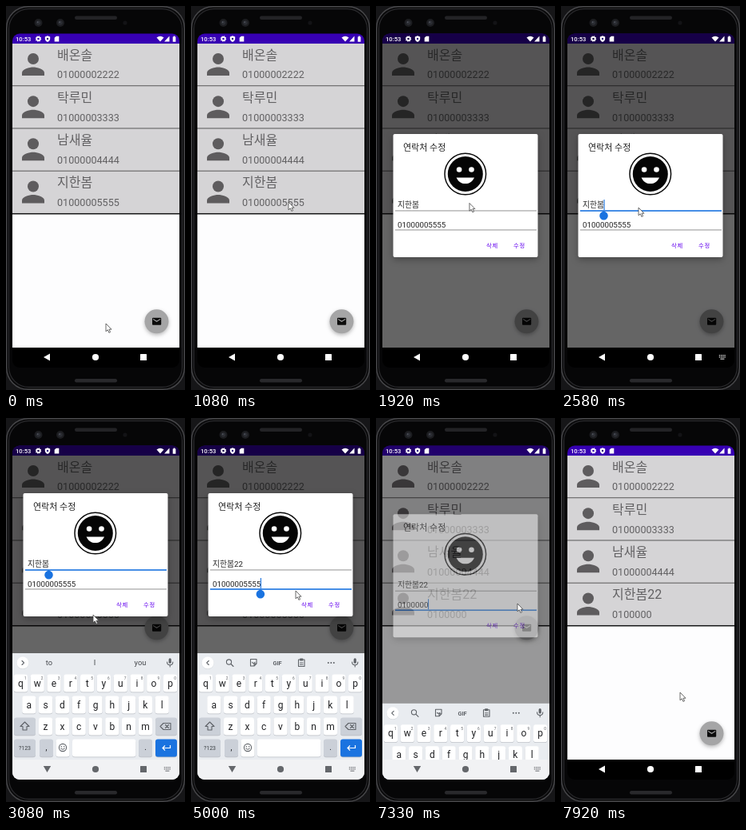
An HTML page for the animation above (8 s loop, 224 px wide and 480 px high).

```html
<!DOCTYPE html>
<html lang="ko">
<head>
<meta charset="utf-8">
<title>연락처</title>
<style>
  html, body { margin: 0; width: 100%; height: 100%; overflow: hidden; background: #000; }
  svg { display: block; width: 224px; height: 480px; font-family: Roboto, "Noto Sans CJK KR", "Noto Sans CJK JP", "Noto Sans CJK", sans-serif; }
  text { white-space: pre; }
  .mid { text-anchor: middle; }
  #dialog { filter: drop-shadow(0 3px 4px rgba(0, 0, 0, .3)); }
  #fab circle { filter: drop-shadow(0 2px 2.5px rgba(0, 0, 0, .28)); }
  .line { fill: none; stroke: #5f6368; stroke-width: 1.1; stroke-linecap: round; stroke-linejoin: round; }
</style>
</head>
<body>
<svg id="stage" viewBox="0 0 224 480"></svg>
<script>
const LOOP = 8000, STEP = 1000 / 12;
const BLUE = '#1a73e0', PURPLE = '#6200ee';

const contacts = [
  ['배온솔', '01000002222'],
  ['탁루민', '01000003333'],
  ['남새율', '01000004444'],
  ['지한봄', '01000005555']
];
const [oldName, oldPhone] = contacts[3];

// [time, value, ...] rows, linear in between
const mouseKeys = [
  [0, 125, 397], [79, 125, 397], [80, 117, 395], [167, 117, 395], [500, 133, 255],
  [667, 133, 255], [1000, 122, 245], [1833, 122, 245], [2250, 97, 252], [2583, 97, 252],
  [3000, 109, 246], [3917, 109, 246], [4500, 131, 216], [6583, 131, 216], [6833, 151, 224],
  [7083, 177, 232], [7333, 177, 232], [7833, 149, 343]
];
const fadeKeys = [[1667, 0], [1750, .2], [1917, 1], [7250, 1], [7417, 0]];
const dimKeys = [[1667, 0], [1750, .075], [1917, .6], [7250, .6], [7500, 0]];
const imeKeys = [[2583, 0], [2750, .65], [2917, 1], [7250, 1], [7417, .2], [7500, 0]];
const deletions = [5833, 5917, 6000, 6167];
const caretResets = [2417, 4000, 4167, 4833, ...deletions];

function sample(keys, t) {
  const next = keys.findIndex(k => k[0] > t);
  if (next === 0) return keys[0].slice(1);
  if (next < 0) return keys[keys.length - 1].slice(1);
  const a = keys[next - 1], b = keys[next];
  const p = (t - a[0]) / (b[0] - a[0]);
  return a.slice(1).map((v, i) => v + (b[i + 1] - v) * p);
}

const rect = (x, y, w, h, fill, r = 0, more = '') =>
  `<rect x="${x}" y="${y}" width="${w}" height="${h}" rx="${r}" fill="${fill}" ${more}/>`;
const circle = (x, y, r, fill, more = '') =>
  `<circle cx="${x}" cy="${y}" r="${r}" fill="${fill}" ${more}/>`;
const path = (d, fill, more = '') => `<path d="${d}" fill="${fill}" ${more}/>`;
const line = d => `<path class="line" d="${d}"/>`;
const text = (x, y, size, fill, str, more = '') =>
  `<text x="${x}" y="${y}" font-size="${size}" fill="${fill}" ${more}>${str}</text>`;
const label = (x, y, size, fill, str, more = '') =>
  text(x, y, size, fill, str, 'class="mid" ' + more);

function phone() {
  const lens = x => circle(x, 21, 5, '#1c1d20') + circle(x, 21, 2.8, '#2b2d33') + circle(x - .8, 20.2, .9, '#50535c');
  return rect(0, 0, 224, 480, '#161618')
    + rect(.7, .7, 222.6, 478.6, '#0a0a0b', 27, 'stroke="#48484b" stroke-width="1.4"')
    + rect(3.6, 3.6, 216.8, 472.8, '#060607', 25, 'stroke="#2a2a2d" stroke-width="1.2"')
    + lens(40.5) + lens(68) + circle(149, 21, 2.6, '#131316')
    + rect(86, 12.5, 53, 4.5, '#232326', 2.2)
    + rect(86, 466, 53, 4.5, '#29292c', 2.2);
}

function statusIcons() {
  const gear = circle(40.5, 41, 2.1, 'none', 'stroke="#fff" stroke-width="1.6"')
    + circle(40.5, 41, 3.1, 'none', 'stroke="#fff" stroke-width="1.2" stroke-dasharray="1.3 1.135"');
  return text(12, 43.8, 7.6, '#fff', '10:53', 'font-weight="500"') + gear
    + path('M52 37.3l3.2 1.2v2.2q0 2.8-3.2 4.2q-3.2-1.4-3.2-4.2v-2.2z', '#fff') + circle(52, 41, 1.2, '#24007a')
    + path('M62.8 37.8h3.5v6.7h-5.6v-4.7z', '#fff')
    + path('M188.5 39.4q4.5-3.4 9 0l-4.5 5.2z', '#fff')
    + path('M204.5 37.6v7h-6.4z', '#fff')
    + path('M208.7 38.4h1v-.9h1.7v.9h1v6.3h-3.7z', '#fff');
}

function contactRow([name, phoneNo], i) {
  const last = i === 3;
  return `<g transform="translate(0 ${i * 53.15})">`
    + rect(8, 47, 209, 53.2, '#d5d4d6') + rect(8, 99.5, 209, 1.5, '#141415')
    + circle(34, 66, 7, '#5e5c5e') + path('M20 87v-3.5c0-4.7 9.3-7 14-7s14 2.3 14 7v3.5z', '#5e5c5e')
    + text(64, 67, 16, '#626163', name, last ? 'id="rowName"' : '')
    + text(64, 90.4, 12.6, '#626163', phoneNo, last ? 'id="rowPhone"' : '') + '</g>';
}

function fab() {
  return '<g id="fab">' + circle(188.5, 394.3, 15, '#a5a5a6')
    + rect(183, 389.8, 11.2, 9, '#0c0c0c', 1)
    + path('M184 391.4l4.6 2.9l4.6-2.9', 'none', 'stroke="#a5a5a6" stroke-width="1.1"') + '</g>';
}

function dialog() {
  const handle = id => `<path id="${id}" d="M0 0l3.8 2.6a5.3 5.3 0 1 1-7.6 0z" fill="${BLUE}"/>`;
  const button = (x, str) => text(x, 235.6, 7.3, PURPLE, str, 'letter-spacing=".8" font-weight="500"');
  return '<g id="dialog">' + rect(21.5, 94, 181, 154, '#fff', 2)
    + text(34, 114.6, 11, '#222', '연락처 수정')
    + circle(111.8, 144, 25.8, '#fff', 'stroke="#0a0a0a" stroke-width="1.5"') + circle(111.8, 144, 22, '#050505')
    + circle(104.1, 138.5, 3.3, '#fff') + circle(119.5, 138.5, 3.3, '#fff')
    + path('M100.6 148.4h22.4c-1.8 4.5-6.1 7.7-11.2 7.7s-9.4-3.2-11.2-7.7z', '#fff')
    + text(27, 186, 9.75, '#222', '', 'id="nameText"') + '<rect id="nameLine" x="24" width="177"/>'
    + text(27, 210.6, 9.75, '#222', '', 'id="phoneText"') + '<rect id="phoneLine" x="24" width="177"/>'
    + button(138, '삭제') + button(172, '수정')
    + rect(0, 0, 1.1, 13, BLUE, 0, 'id="caret"') + handle('handle') + '</g>';
}

function keyboard() {
  const GREY = '#cbd0d8', INK = '#202124';
  const key = (x, y, w, fill) => rect(x, y + .8, w, 22, '#b9bdc4', 3) + rect(x, y, w, 22, fill, 3);
  const letters = (str, x0, y, hints) => [...str].map((c, i) => {
    const x = x0 + i * 20.8;
    return key(x - 8.6, y, 17.2, '#fff') + label(x, y + 15, 12, INK, c)
      + (hints ? label(x + 6, y + 6.5, 4.8, '#5f6368', (i + 1) % 10) : '');
  }).join('');
  const words = [['to', 54], ['I', 111], ['you', 168]].map(([w, x]) => label(x, 309.2, 9.3, '#44474b', w)).join('');
  const tools = circle(47.5, 305, 3.1, 'none', 'class="line"') + line('M50 307.5l3 3')
    + line('M74.5 301.5h7.5v5.5l-3 3h-4.5zM82 307h-3v3M76.5 305.5q1.7 2 3.4 0')
    + label(108, 308.7, 7.4, '#5f6368', 'GIF', 'font-weight="700"')
    + line('M134.5 302h7.5v8.5h-7.5zM136.7 301h3v2h-3zM136.5 306h3.5M136.5 308.3h3.5')
    + [171.8, 175.3, 178.8].map(x => circle(x, 306, 1, '#5f6368')).join('');
  return '<g id="ime">' + rect(8, 294, 209, 158, '#e9ecf0')
    + circle(21, 306.5, 7.6, '#c9cdd2') + circle(21, 306, 7.6, '#fff')
    + `<g id="words">${words}${line('M20 303.5l2.5 2.5l-2.5 2.5')}</g>`
    + `<g id="tools">${tools}${line('M22.2 303.5l-2.5 2.5l2.5 2.5')}</g>`
    + rect(203.6, 300.3, 3.2, 6.5, '#5f6368', 1.6) + line('M201.6 305q0 3.8 3.6 3.8t3.6-3.8M205.2 309v2')
    + letters('qwertyuiop', 18.4, 320.5, true) + letters('asdfghjkl', 28.8, 347.5) + letters('zxcvbnm', 49.6, 374.5)
    + key(10, 374.5, 27, GREY) + line('M23.5 380l5.5 5.5h-3v4.5h-5v-4.5h-3z')
    + key(187, 374.5, 27, GREY) + line('M197 381.5h9v8h-9l-4-4zM199.5 383.5l4 4M203.5 383.5l-4 4')
    + key(10, 401.5, 27, GREY) + label(23.5, 415, 7, '#3c4043', '?123')
    + key(42, 401.5, 17, GREY) + label(50.5, 415, 10, INK, ',')
    + key(62.5, 401.5, 17, '#fff') + circle(71, 412, 4.6, 'none', 'class="line"')
    + circle(69.3, 410.8, .8, '#5f6368') + circle(72.7, 410.8, .8, '#5f6368') + line('M68.8 413q2.2 2.6 4.4 0')
    + key(83, 401.5, 79.5, '#fff')
    + key(166, 401.5, 17, GREY) + label(174.5, 415, 10, INK, '.')
    + key(187, 401.5, 27, BLUE) + path('M205.5 409v3.5h-9.5M199 409.5l-3 3l3 3', 'none', 'stroke="#fff" stroke-width="1.2"')
    + '</g>';
}

function navBar() {
  let dots = '';
  for (let i = 0; i < 8; i++) dots += rect(197.8 + (i % 4) * 2.2, 436 + (i >> 2) * 2.2, 1.4, 1.4, 'currentColor');
  return '<g id="nav">' + rect(8, 427, 209, 25, '#000', 0, 'id="navBack"')
    + path('M55 434.5v9l-8-4.5z', 'currentColor', 'id="backIcon"')
    + circle(112, 439, 4.1, 'currentColor') + rect(168, 435, 8, 8, 'currentColor', .6)
    + `<g id="imeIcon" opacity=".8">${dots}${rect(199.4, 440.6, 5, 1.2, 'currentColor')}</g></g>`;
}

const stage = document.getElementById('stage');
stage.innerHTML = '<clipPath id="screen">' + rect(8, 34.6, 209, 417.4, '#fff', 9) + '</clipPath>'
  + phone() + '<g clip-path="url(#screen)">' + rect(8, 34, 209, 13.5, '#3700b3') + rect(8, 47, 209, 380, '#fdfdfe')
  + contacts.map(contactRow).join('') + fab()
  + rect(8, 34, 209, 393, '#000', 0, 'id="dim"')
  + statusIcons() + dialog() + keyboard() + navBar() + '</g>'
  + '<path id="mouse" d="M0 0v9.8l2.3-2l1.6 3.6l1.7-.8l-1.6-3.4h3z" fill="#fff" stroke="#444" stroke-width=".8" stroke-linejoin="round"/>';

const el = {};
stage.querySelectorAll('[id]').forEach(node => el[node.id] = node);
const set = (id, attrs) => { for (const k in attrs) el[id].setAttribute(k, attrs[k]); };
const show = (id, on) => set(id, { visibility: on ? 'visible' : 'hidden' });
const move = (id, x, y) => set(id, { transform: `translate(${x} ${y})` });
const write = (id, str) => { if (el[id].textContent !== str) el[id].textContent = str; };
const underline = (id, y, on) => set(id, { y: y - (on ? .8 : .5), height: on ? 1.6 : .9, fill: on ? BLUE : '#858585' });

function render(t) {
  const [fade] = sample(fadeKeys, t), [dim] = sample(dimKeys, t), [ime] = sample(imeKeys, t);
  const focus = t < 2333 ? '' : t < 4833 ? 'name' : 'phone';
  const name = oldName + '22'.slice(0, (t >= 4000) + (t >= 4167));
  const gone = deletions.filter(d => t >= d).length;
  const phoneNo = oldPhone.slice(0, oldPhone.length - gone);
  const saved = t >= 7250;

  move('mouse', ...sample(mouseKeys, t));
  write('rowName', saved ? name : oldName);
  write('rowPhone', saved ? phoneNo : oldPhone);
  set('dim', { opacity: dim });
  move('fab', 0, ime > .3 ? -132 : 0);

  set('dialog', { opacity: fade });
  show('dialog', fade > 0);
  move('dialog', 0, 66 * (1 - ime));
  write('nameText', name);
  write('phoneText', phoneNo);
  underline('nameLine', 190, focus === 'name');
  underline('phoneLine', 214, focus === 'phone');

  const onName = focus === 'name';
  const end = onName ? 53.8 + (name.length - 3) * 5.5 : 27 + phoneNo.length * 5.47;
  const reset = caretResets.filter(r => t >= r).pop();
  const blinkOn = reset !== undefined && Math.floor((t - reset + 1) / 500) % 2 === 0;
  const open = focus && fade > 0;
  set('caret', { x: end - .3, y: onName ? 176 : 200 });
  show('caret', open && blinkOn);
  move('handle', end - .3, onName ? 190 : 214);
  show('handle', open && (onName ? t < 4000 : gone === 0));

  move('ime', 0, 158 * (1 - ime));
  show('ime', ime > 0);
  show('words', ime > 0 && t < 4833);
  show('tools', ime > 0 && t >= 4833);

  const light = ime > .5;
  set('nav', { color: light ? '#64676b' : '#fff' });
  set('navBack', { fill: light ? '#f1f2f4' : '#000' });
  set('backIcon', { d: light ? 'M46.8 435h9.4l-4.7 8z' : 'M55 434.5v9l-8-4.5z' });
  show('imeIcon', t >= 2333 && t < 7583);
}

const start = performance.now();
function tick(now) {
  const t = Math.max(0, now - start) % LOOP;
  render(Math.round(Math.floor((t + 4) / STEP) * STEP));
  requestAnimationFrame(tick);
}
render(0);
requestAnimationFrame(tick);
</script>
</body>
</html>
```
